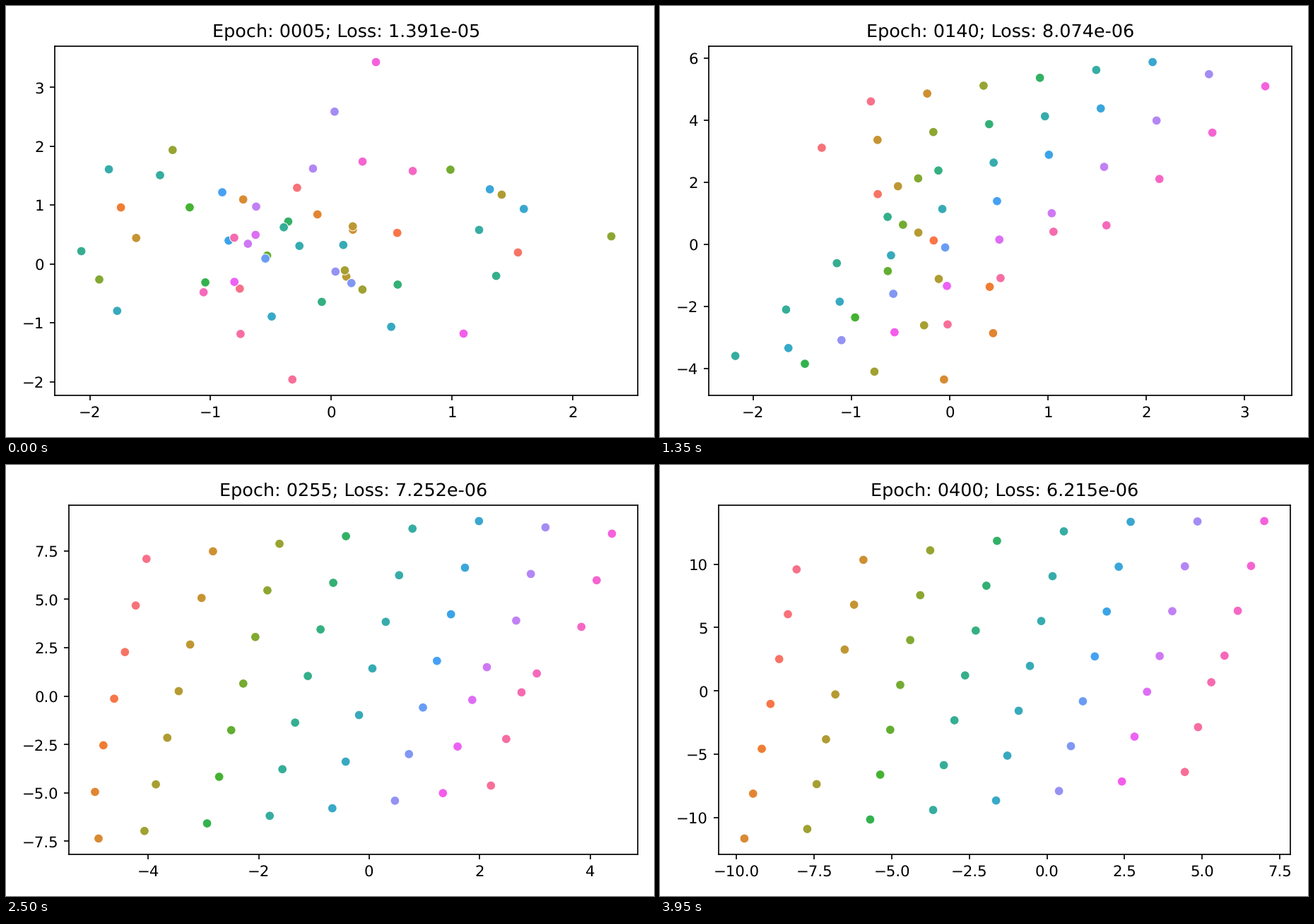
A matplotlib script that plays this animation: 917x611 px, repeating every 4000 ms.

```python
import numpy as np
import matplotlib.pyplot as plt
from matplotlib.animation import FuncAnimation

WIDTH, HEIGHT, DPI = 917, 611, 152.8
FRAMES, INTERVAL, EPOCHS_PER_FRAME = 80, 50, 5
COLS, ROWS = 8, 7
N = COLS * ROWS
START, ORDERED, SORTED, END = 5, 50, 140, 400  # epochs of the phases

plt.rcParams["text.hinting"] = "no_hinting"


def husl(hue, sat, light):
    """RGB of an HUSL colour (hue in degrees, the others in percent)."""
    m = np.array([[3.2406, -1.5372, -0.4986],
                  [-0.9689, 1.8758, 0.0415],
                  [0.0557, -0.2040, 1.0570]])
    s, c = np.sin(np.radians(hue)), np.cos(np.radians(hue))
    lum = ((light + 16) / 116) ** 3
    chroma = np.inf
    for a, b, d in m:
        top = (0.99915 * a + 1.05122 * b + 1.14460 * d) * lum
        bottom = ((0.86330 * d - 0.17266 * b) * s
                  + (0.12949 * d - 0.38848 * a) * c) * lum
        for t in (0, 1):
            limit = light * (top - 1.05122 * t) / (bottom + 0.17266 * s * t)
            if 0 < limit < chroma:
                chroma = limit
    chroma *= sat / 100
    u = c * chroma / (13 * light) + 0.19784
    v = s * chroma / (13 * light) + 0.46834
    x = 9 * lum * u / (4 * v)
    z = (9 * lum - 15 * v * lum - v * x) / (3 * v)
    rgb = np.clip(m @ [x, lum, z], 0, 1)
    return np.where(rgb <= 0.0031308, 12.92 * rgb,
                    1.055 * rgb ** (1 / 2.4) - 0.055)


def rescale(values, lo, hi):
    return np.interp(values, (values.min(), values.max()), (lo, hi))


# Grid cell of each point, column by column from the top
col, row = np.divmod(np.arange(N), ROWS)
up = 3 - row
right = np.maximum(col - 5, 0)

# Untrained output: noise that leans upwards in the last columns
rng = np.random.default_rng(4)
cloud = np.column_stack([
    rescale(rng.normal(0, 0.85, N) + 0.04 * col * up, -2.07, 2.32),
    rescale(rng.normal(0, 0.6, N) + 0.016 * col ** 2 * up, -1.96, 3.43)])


def sheet(epoch):
    """The grid as a sheet that grows, tilts and unfolds."""
    late = max(epoch - SORTED, 0)
    u = late / (END - SORTED)
    early = np.exp(-max(epoch - ORDERED, 0) / 40)

    # Sheared columns, pinched on the lower right
    spacing = 0.58 + 1.2 * u + 0.31 * u ** 2
    shear = 0.22 + 0.9 * (u - 0.6) ** 2
    x = (-0.1 + u - 1.45 * u ** 2 + shear * up
         + spacing * (col - 4) * (1 + 0.01 * up)
         - 0.27 * np.sin(np.pi * u) * right * (row >= 3))

    # The lower left corner is folded over until its hinge leaves the sheet
    hinge = 3 - late / 50
    crease = 1 + late / 30
    x += (1.3 * np.maximum(hinge - col, 0)
          * np.clip((row - crease) / 3.5, 0, 1))
    x = x * (1 - 0.38 * early) + 0.2 * early

    # Evenly spaced rows, dented on the upper right
    step = 0.42 + 0.0078 * epoch - 0.17 * early
    tilt = 0.24 + 0.51 * u ** 1.5 + 0.13 * early
    y = (0.85 - 0.9 * early + tilt * (col - 2.5) + step * up
         - 0.72 * (1 - early) * right * (row < 4))
    return np.column_stack([x, y])


def pose(epoch):
    order = min((epoch - START) / (ORDERED - START), 1)
    return (1 - order) * cloud + order * sheet(epoch)


def loss(epoch):
    drop = 4.871 * np.exp(-(epoch - START) / 5)
    return (6.215 + 0.00715 * (END - epoch) + drop) * 1e-6


def padded(values, margin=0.05):
    lo, hi = values.min(), values.max()
    pad = margin * (hi - lo)
    return lo - pad, hi + pad


palette = [husl((i / N + 0.01) % 1 * 359, 0.9 * 99, 0.65 * 99)
           for i in range(N)]

# The small excess keeps the canvas from being truncated a pixel short
fig, ax = plt.subplots(
    figsize=((WIDTH + 0.01) / DPI, (HEIGHT + 0.01) / DPI), dpi=DPI)
dots = ax.scatter(*cloud.T, s=36, c=palette, edgecolors="white",
                  linewidths=0.48)


def update(i):
    epoch = EPOCHS_PER_FRAME * (i + 1)
    points = pose(epoch)
    dots.set_offsets(points)
    ax.set_xlim(padded(points[:, 0]))
    ax.set_ylim(padded(points[:, 1]))
    ax.set_title(f"Epoch: {epoch:04d}; Loss: {loss(epoch):.3e}")
    fig.tight_layout()
    fig.subplots_adjust(top=1 - 57 / HEIGHT, bottom=1 - 552 / HEIGHT)
    return (dots,)


anim = FuncAnimation(fig, update, frames=FRAMES, interval=INTERVAL,
                     repeat=True, repeat_delay=0)
plt.show()
```
